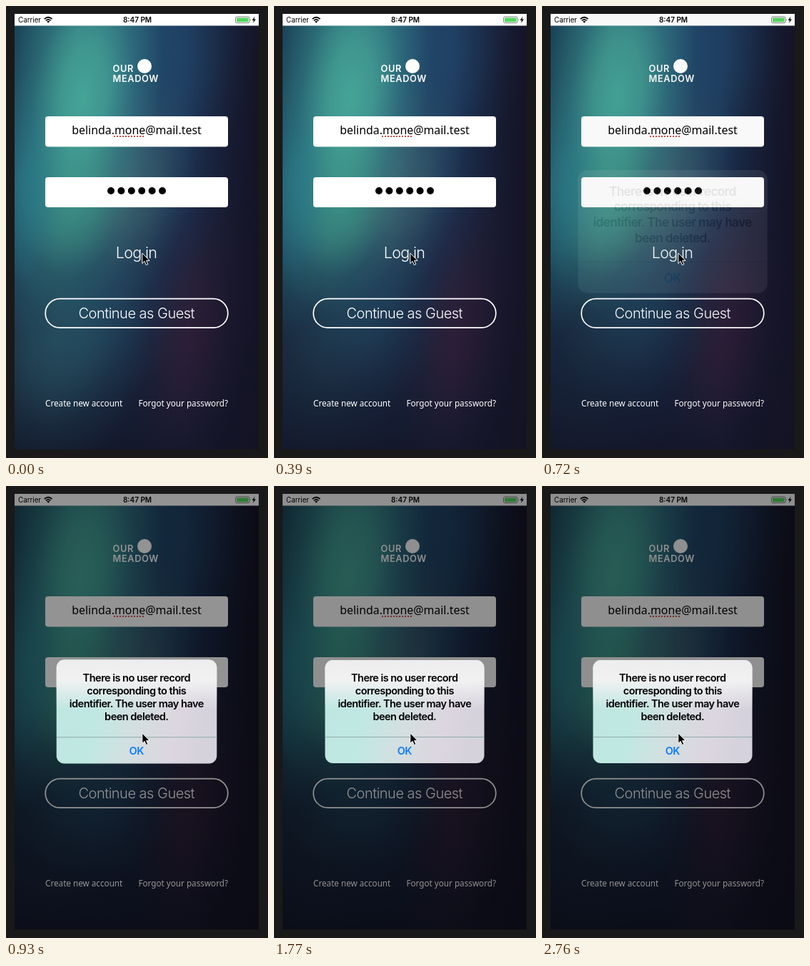
These frames come from a looping animation (367x631 px, 2790 ms). An HTML page:

```html
<!DOCTYPE html>
<html lang="en">
<head>
<meta charset="utf-8">
<title>Login alert</title>
<style>
  html, body { margin: 0; width: 100%; height: 100%; overflow: hidden; background: #191919; }
  svg { position: absolute; left: 0; top: 0; display: block; }
  text { font-family: Inter, "Liberation Sans", sans-serif; }
  .note { font-family: "Noto Sans", "Open Sans", sans-serif; font-size: 11.7px; font-weight: 500; }
  #email {
    position: absolute; left: 55px; top: 154px; width: 256px; height: 42px;
    font: 500 15.9px/39px "Noto Sans", "Open Sans", sans-serif;
    text-align: center; color: #000; white-space: nowrap;
  }
  #email span { text-decoration: underline dotted #d04848 2px; text-underline-offset: 2px; }
  .logo { font-size: 12.8px; font-weight: 600; letter-spacing: .6px; }
  .alert text { font-size: 14.5px; font-weight: 600; letter-spacing: -.55px; text-anchor: middle; }
</style>
</head>
<body>
<svg width="367" height="631">
  <defs>
    <clipPath id="screen"><rect x="12" y="11" width="342" height="608"/></clipPath>
    <linearGradient id="base" x1="0" y1="0" x2="1" y2=".12">
      <stop offset="0" stop-color="#1b4459"/>
      <stop offset=".25" stop-color="#286274"/>
      <stop offset=".5" stop-color="#235070"/>
      <stop offset=".75" stop-color="#1c3151"/>
      <stop offset="1" stop-color="#171a33"/>
    </linearGradient>
    <linearGradient id="fall" x1="0" y1="0" x2="0" y2="1">
      <stop offset=".38" stop-color="#161a31" stop-opacity="0"/>
      <stop offset=".72" stop-color="#161a31" stop-opacity=".72"/>
      <stop offset="1" stop-color="#13162a" stop-opacity=".96"/>
    </linearGradient>
    <linearGradient id="edge" x1="0" y1="0" x2="1" y2="0">
      <stop offset=".7" stop-color="#14101f" stop-opacity="0"/>
      <stop offset="1" stop-color="#14101f" stop-opacity=".6"/>
    </linearGradient>
  </defs>
  <g clip-path="url(#screen)">
    <rect x="12" y="11" width="342" height="608" fill="url(#base)"/>
    <rect x="12" y="11" width="342" height="608" fill="url(#fall)"/>
    <g id="lights"></g>
    <rect x="12" y="11" width="342" height="608" fill="url(#edge)"/>
  </g>

  <rect x="12" y="11" width="342" height="16.5" fill="#fff"/>
  <text x="17" y="23" font-size="9.8">Carrier</text>
  <g fill="none" stroke="#000" stroke-width="1.8">
    <path d="M53.8 18.2Q59.2 13.2 64.6 18.2M55.9 20.4Q59.2 17.4 62.5 20.4"/>
    <path d="M57.2 21.6Q59.2 20 61.2 21.6L59.2 23.7Z" fill="#000" stroke="none"/>
  </g>
  <text x="184" y="23" font-size="10" font-weight="600" text-anchor="middle">8:47 PM</text>
  <rect x="321.5" y="15" width="19.5" height="8.6" rx="2" fill="#fff" stroke="#777" stroke-width=".9"/>
  <rect x="323" y="16.4" width="16.5" height="5.8" rx=".8" fill="#55d65f"/>
  <path d="M342.2 17.6q1.4 1.7 0 3.4z" fill="#777"/>
  <path d="M348.6 14.6L344.6 20H347L345.8 24L350 18.4H347.4Z"/>

  <g fill="#fff">
    <text class="logo" x="149.5" y="92">OUR</text>
    <text class="logo" x="149.5" y="106">MEADOW</text>
    <circle cx="194" cy="84" r="10"/>
    <rect x="55" y="154" width="256" height="42.5" rx="4"/>
    <rect x="55" y="239" width="256" height="42" rx="4"/>
    <text x="182.5" y="352" font-size="21.5" font-weight="300" letter-spacing="-.7" text-anchor="middle">Log in</text>
    <text x="182.8" y="436" font-size="20" font-weight="300" letter-spacing="-.5" text-anchor="middle">Continue as Guest</text>
    <text class="note" x="55" y="559">Create new account</text>
    <text class="note" x="311" y="559" text-anchor="end">Forgot your password?</text>
  </g>
  <rect x="55.2" y="408.6" width="255.6" height="40.6" rx="20.3" fill="none" stroke="#fff" stroke-width="1.7"/>
  <g id="dots"></g>
</svg>

<div id="email">belinda.<span>mone</span>@mail.test</div>

<svg width="367" height="631">
  <defs>
    <linearGradient id="glass" x1="0" y1="0" x2="1" y2=".12">
      <stop offset="0" stop-color="#bfe6e1"/>
      <stop offset=".3" stop-color="#c0e8e2"/>
      <stop offset=".55" stop-color="#d3dfe0"/>
      <stop offset=".8" stop-color="#dcd6df"/>
      <stop offset="1" stop-color="#d5d2dc"/>
    </linearGradient>
    <linearGradient id="sheen" x1="0" y1="0" x2="0" y2="1">
      <stop offset="0" stop-color="#ededee"/>
      <stop offset=".2" stop-color="#f1f1f2"/>
      <stop offset=".48" stop-color="#eeeef0" stop-opacity="0"/>
    </linearGradient>
  </defs>
  <rect id="dim" x="12" y="11" width="342" height="608"/>
  <g id="alert" class="alert">
    <rect x="71.5" y="243" width="223" height="144" rx="11" fill="url(#glass)"/>
    <rect x="71.5" y="243" width="223" height="144" rx="11" fill="url(#sheen)"/>
    <rect x="71.5" y="350" width="223" height="1" fill="#8fabac"/>
    <text x="182.8" y="273">There is no user record</text>
    <text x="182.8" y="291">corresponding to this</text>
    <text x="182.8" y="309.2">identifier. The user may have</text>
    <text x="182.8" y="327.4">been deleted.</text>
    <text x="182.8" y="374.5" fill="#0f7cf5">OK</text>
  </g>
  <path d="M190.8 345V359.4L194.1 356.3L196.3 361.6L198.8 360.5L196.6 355.4H201Z"
        fill="#000" stroke="#fff" stroke-width="1" stroke-linejoin="round"/>
</svg>

<script>
const LOOP = 2790, STEP = 30, ALERT_AT = 704, DIM = 0.44;
const byId = id => document.getElementById(id);

function add(parent, tag, attrs) {
  const el = document.createElementNS("http://www.w3.org/2000/svg", tag);
  for (const k in attrs) el.setAttribute(k, attrs[k]);
  return parent.appendChild(el);
}

const lights = byId("lights");
let count = 0;

function blob(x, y, rx, ry, tilt, color, alpha) {
  const id = "blob" + count++;
  const fill = add(lights, "radialGradient", { id });
  for (const [offset, part] of [[0, 1], [.3, .8], [.65, .28], [1, 0]])
    add(fill, "stop", { offset, "stop-color": color, "stop-opacity": alpha * part });
  return add(lights, "ellipse", {
    cx: x, cy: y, rx, ry, fill: `url(#${id})`, transform: `rotate(${tilt} ${x} ${y})`
  });
}

blob(108, 130, 108, 250, 7, "#4bb09d", .85);
blob(95, 285, 95, 150, 10, "#43a08a", .6);
blob(30, 270, 60, 190, 4, "#2b8294", .55);
blob(185, 260, 75, 170, 14, "#557771", .4);
blob(265, 70, 90, 160, 10, "#24517a", .4);
blob(262, 450, 85, 220, 8, "#3c1f37", .55);
blob(130, 430, 110, 130, 8, "#24506a", .4);
const glow = blob(70, 470, 130, 190, 8, "#2d6672", .5);

for (let i = 0; i < 6; i++)
  add(byId("dots"), "circle", { cx: 147 + i * 14.4, cy: 258, r: 5 });

// Critically damped spring, 0 to 1
function spring(ms) {
  const x = Math.max(0, ms) * 0.02285;
  return 1 - (1 + x) * Math.exp(-x);
}

function draw(t) {
  const p = spring(t - ALERT_AT);
  const scale = 1.2 - 0.2 * p;
  byId("dim").setAttribute("opacity", DIM * p);
  byId("alert").setAttribute("opacity", Math.min(1, p * 1.6));
  byId("alert").setAttribute("transform",
    `translate(183 315) scale(${scale}) translate(-183 -315)`);
  lights.setAttribute("transform", `translate(${-6 * t / LOOP} ${-8 * t / LOOP})`);
  glow.setAttribute("opacity", Math.max(0, 1 - t / 500));
}

function tick() {
  const t = performance.now() % LOOP;
  draw(Math.floor(t / STEP) * STEP);
  requestAnimationFrame(tick);
}
tick();
</script>
</body>
</html>
```
